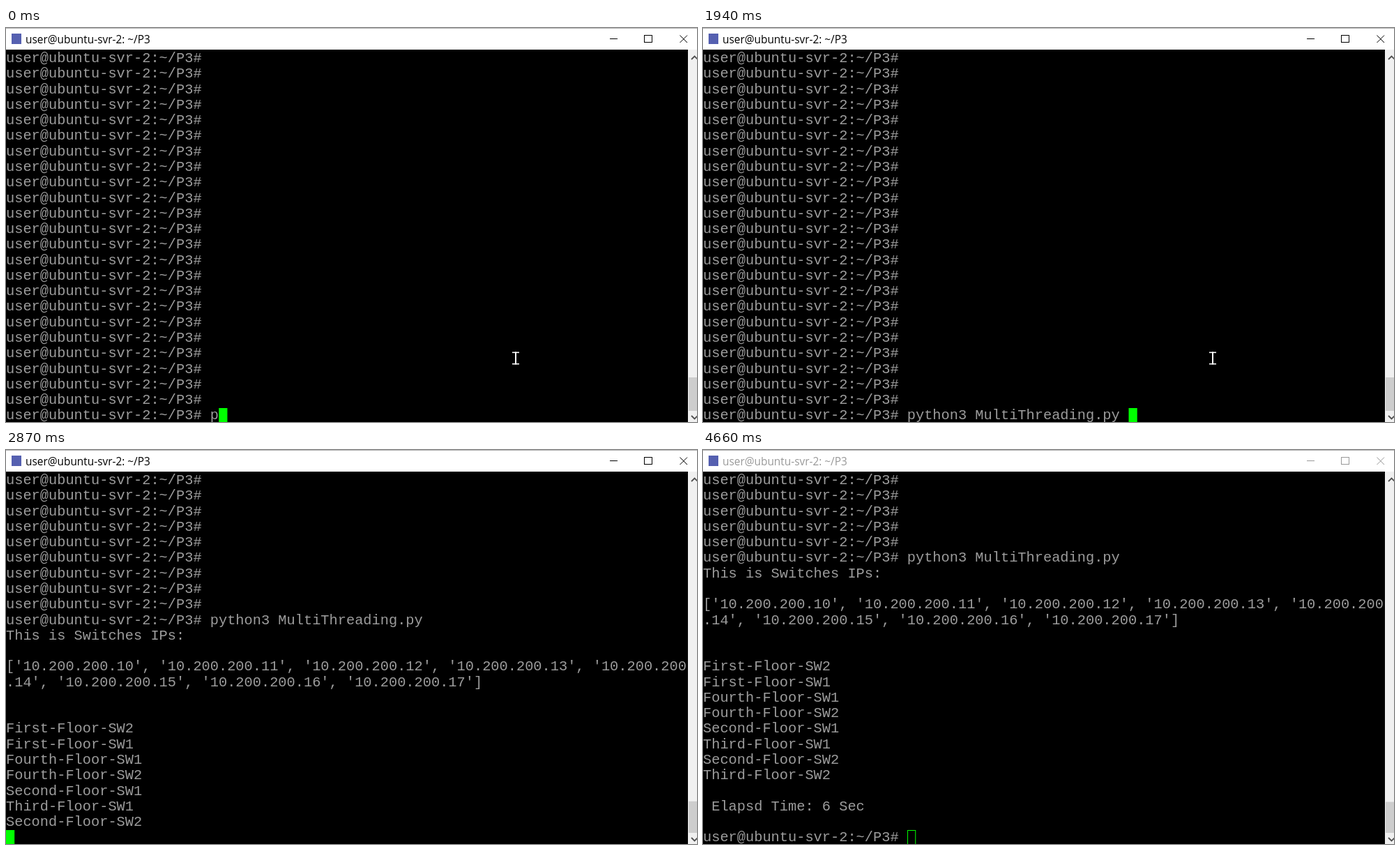
An HTML page with a canvas for the animation above (4740 ms loop, 991x565 px).

```html
<!DOCTYPE html>
<html lang="en">
<head>
<meta charset="utf-8">
<title>Terminal session</title>
<style>
  html, body { margin: 0; width: 100%; height: 100%; overflow: hidden; background: #000; }
  canvas { display: block; }
</style>
</head>
<body>
<canvas id="stage" width="991" height="565"></canvas>
<script>
const ctx = document.getElementById('stage').getContext('2d');
const WIDTH = 991, HEIGHT = 565, LOOP = 4740;
const TOP = 32, ROWS = 24, COL_W = 12.21, ROW_H = 22.28, BASELINE = 17;
const TERMINAL_RIGHT = 978;

const PROMPT = 'user@ubuntu-svr-2:~/P3#';
const COMMAND = 'python3 MultiThreading.py ';
const OUTPUT = [
  'This is Switches IPs:',
  '',
  "['10.200.200.10', '10.200.200.11', '10.200.200.12', '10.200.200.13', '10.200.200",
  ".14', '10.200.200.15', '10.200.200.16', '10.200.200.17']",
  '',
  '',
  'First-Floor-SW2',
  'First-Floor-SW1',
  'Fourth-Floor-SW1',
  'Fourth-Floor-SW2',
  'Second-Floor-SW1',
  'Third-Floor-SW1',
  'Second-Floor-SW2',
  'Third-Floor-SW2',
  '',
  ' Elapsd Time: 6 Sec',
  ''
];

// [time in ms, value]; the last entry already reached applies
const TYPED = [[0, 1], [240, 3], [400, 4], [630, 7], [1180, 8], [1640, 9], [1870, 10], [1940, 26]];
const PRINTED = [[0, 0], [2490, 6], [2800, 10], [2870, 13], [3120, 14], [4050, 17]];
const ENTER = 2340, MOUSE_HIDDEN = 2720, FINISHED = 4130, BLUR = 4660;

const valueAt = (steps, t) => steps.filter(([start]) => start <= t).pop()[1];

function rect(x, y, w, h, color) {
  ctx.fillStyle = color;
  ctx.fillRect(x, y, w, h);
}

function polyline(color, width, ...points) {
  ctx.strokeStyle = color;
  ctx.lineWidth = width;
  ctx.beginPath();
  points.forEach(([x, y]) => ctx.lineTo(x, y));
  ctx.stroke();
}

function drawTitleBar(focused) {
  const ink = focused ? '#000' : '#999';
  rect(0, 0, WIDTH, 31, '#fff');
  rect(0, 0, WIDTH, 1, '#b4b4b4');
  rect(8, 8, 14, 15, '#5560b0');
  ctx.fillStyle = ink;
  ctx.font = '15.4px "Open Sans", sans-serif';
  ctx.fillText(PROMPT.slice(0, 18) + ' ~/P3', 28, 21.5);
  polyline(ink, 1, [866, 15.5], [877, 15.5]);
  ctx.strokeRect(915.5, 10.5, 11, 10);
  polyline(ink, 1, [966.5, 10.5], [977, 21]);
  polyline(ink, 1, [977, 10.5], [966.5, 21]);
}

function drawScrollbar(scrolled) {
  const thumbTop = 501 + scrolled * 0.2;
  rect(TERMINAL_RIGHT, TOP - 1, WIDTH - TERMINAL_RIGHT, HEIGHT, '#f0f0f0');
  rect(TERMINAL_RIGHT + 1, thumbTop, 12, 549 - thumbTop, '#cdcdcd');
  polyline('#505050', 1.8, [983, 45], [987.5, 40.5], [992, 45]);
  polyline('#505050', 1.8, [983, 556], [987.5, 560.5], [992, 556]);
}

function drawMouse(x, y) {
  rect(x - 1, y - 9, 2, 18, '#fff');
  rect(x - 5, y - 9, 10, 1.6, '#fff');
  rect(x - 5, y + 7.4, 10, 1.6, '#fff');
}

function terminalLines(t) {
  const history = Array(ROWS - 1).fill(PROMPT);
  const command = `${PROMPT} ${COMMAND.slice(0, valueAt(TYPED, t))}`;
  if (t < ENTER) return [...history, command];
  const output = OUTPUT.slice(0, valueAt(PRINTED, t));
  return [...history, command, ...output, t < FINISHED ? '' : PROMPT + ' '];
}

function draw(t) {
  const focused = t < BLUR;
  const lines = terminalLines(t);
  const scrolled = lines.length - ROWS;
  rect(0, 0, WIDTH, HEIGHT, '#000');

  ctx.font = `${COL_W / 0.6001}px "Liberation Mono", monospace`;
  ctx.fillStyle = '#9c9c9c';
  lines.slice(-ROWS).forEach((line, row) => ctx.fillText(line, 0, TOP + row * ROW_H + BASELINE));

  const cursorX = lines[lines.length - 1].length * COL_W;
  if (focused) {
    rect(cursorX, 545, COL_W, 22, '#0f0');
  } else {
    ctx.strokeStyle = '#0f0';
    ctx.lineWidth = 1;
    ctx.strokeRect(cursorX + 0.5, 545.5, COL_W - 1, 21);
  }

  if (t < MOUSE_HIDDEN) drawMouse(731, 473.5);
  drawScrollbar(scrolled);
  drawTitleBar(focused);
}

function tick() {
  draw(performance.now() % LOOP);
  requestAnimationFrame(tick);
}
tick();
</script>
</body>
</html>
```
